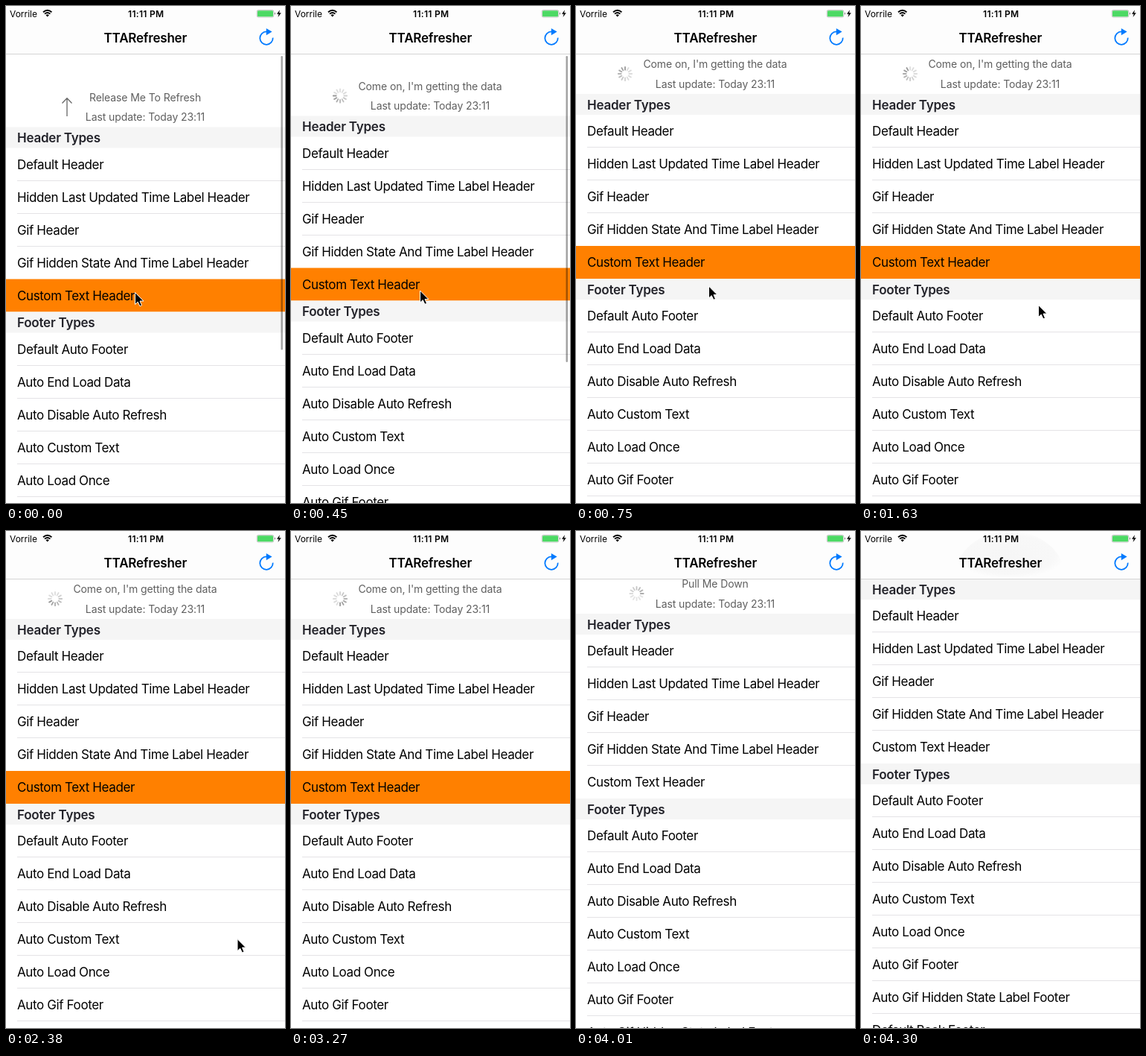
An HTML page for the animation above (4.75 s loop, 375x667 px).

```html
<!DOCTYPE html>
<html lang="en">
<head>
<meta charset="utf-8">
<title>TTARefresher</title>
<style>
  html, body { margin: 0; width: 100%; height: 100%; overflow: hidden; background: #fff; }
  svg { display: block; width: 375px; height: 667px; }
  text { font-family: Inter, Roboto, sans-serif; fill: #000; }
  .row { font-size: 17px; letter-spacing: -.38px; }
  .head { font-size: 17px; font-weight: 600; letter-spacing: -.23px; fill: #23232a; }
  .title { font-size: 17px; font-weight: 600; letter-spacing: -.2px; }
  .label { font-size: 14px; letter-spacing: -.09px; fill: #5f5f5f; }
  .status { font-size: 12px; }
  .clock { font-weight: 600; letter-spacing: .3px; }
  .mid { text-anchor: middle; }
</style>
</head>
<body>
<svg viewBox="0 0 375 667" xmlns="http://www.w3.org/2000/svg">
  <defs>
    <radialGradient id="haze">
      <stop offset="0" stop-color="#f6f6f6"/>
      <stop offset=".8" stop-color="#f8f8f8"/>
      <stop offset="1" stop-color="#fdfdfd"/>
    </radialGradient>
  </defs>
  <rect width="375" height="667" fill="#fff"/>

  <g id="list">
    <text id="state" class="label mid" x="187" y="-35"></text>
    <text class="label mid" x="187" y="-8.5">Last update: Today 23:11</text>
    <path id="arrow" d="M82 -39V-14.5M75.5 -32L82 -38.7L88.5 -32" fill="none" stroke="#666" stroke-width="1.3"/>
    <g id="spinner"></g>
  </g>

  <rect id="bar" x="369.5" y="67" width="2.5" rx="1.25" fill="#000" fill-opacity=".36"/>

  <rect width="375" height="64" fill="#fdfdfd"/>
  <path id="glow" d="M125 64A75 64 0 0 1 275 64Z" fill="url(#haze)"/>
  <rect y="64" width="375" height="1" fill="#d4d4d4"/>
  <text class="title mid" x="187.3" y="48.5">TTARefresher</text>

  <text class="status" x="5" y="14.5">Vorrile</text>
  <g fill="none" stroke="#000" stroke-width="1.9">
    <path d="M50 8.3Q55.7 3.1 61.4 8.3M52 10.6Q55.7 7.2 59.4 10.6"/>
  </g>
  <path d="M53.5 12.2Q55.7 10.2 57.9 12.2L55.7 14.6Z"/>
  <text class="status clock mid" x="188.3" y="14.5">11:11 PM</text>
  <rect x="337.2" y="5.5" width="22.6" height="9.5" rx="2" fill="none" stroke="#8a8a8a" stroke-width=".5"/>
  <rect x="338" y="6.3" width="21" height="7.9" rx="1.2" fill="#4cd964"/>
  <path d="M361 8.6Q363 10.2 361 11.8Z" fill="#666"/>
  <path d="M368 5.3L364 10.8H366.6L365.6 15L369.8 9.3H367.1Z"/>

  <path d="M350 34.4A8.7 8.7 0 1 0 358.7 42.6" fill="none" stroke="#007aff" stroke-width="1.8"/>
  <path d="M349.8 30L357.6 34.6L349.8 39.2Z" fill="#007aff"/>

  <path id="cursor" d="M0 0V16L3.7 12.6L6.4 18.3L9 17.2L6.5 11.5H11.4Z"
        stroke="#fff" stroke-width="1" stroke-linejoin="round"/>
</svg>
<script>
const $ = id => document.getElementById(id);
const LOOP = 4750, HOLD = 450, LAST = 26;
const PICKED = 'Custom Text Header';
const sections = [
  ['Header Types', ['Default Header', 'Hidden Last Updated Time Label Header', 'Gif Header',
    'Gif Hidden State And Time Label Header', PICKED]],
  ['Footer Types', ['Default Auto Footer', 'Auto End Load Data', 'Auto Disable Auto Refresh',
    'Auto Custom Text', 'Auto Load Once', 'Auto Gif Footer',
    'Auto Gif Hidden State Label Footer', 'Default Back Footer']]
];
// pointer stops: step, x, y
const stops = [[-1, 173.5, 384.5], [0, 173.5, 382], [2, 178.5, 376], [8, 238.5, 401.5],
  [15, 340, 606], [16, 358, 642], [17, 376, 680]];

function add(parent, tag, attrs, label) {
  const el = document.createElementNS('http://www.w3.org/2000/svg', tag);
  for (const key in attrs) el.setAttribute(key, attrs[key]);
  if (label) el.textContent = label;
  return parent.appendChild(el);
}

// Returns the highlight of the picked row and the hairline it replaces.
function buildList() {
  const list = $('list');
  let y = 0, fill, line;
  for (const [name, rows] of sections) {
    add(list, 'rect', { y, width: 375, height: 28, fill: '#f5f5f5' });
    add(list, 'text', { class: 'head', x: 15, y: y + 20.5 }, name);
    y += 28;
    rows.forEach((row, i) => {
      const rule = i && add(list, 'rect', { x: 15, y: y - .5, width: 360, height: .5, fill: '#c8c7cc' });
      if (row === PICKED) {
        line = rule;
        fill = add(list, 'rect', { y, width: 375, height: 44, fill: '#ff8000' });
      }
      add(list, 'text', { class: 'row', x: 15, y: y + 28 }, row);
      y += 44;
    });
  }
  return [fill, line];
}

const [pickFill, pickLine] = buildList();
const petals = Array.from({ length: 12 }, (_, i) => add($('spinner'), 'line',
  { y1: -5.3, y2: -9.2, stroke: '#777', 'stroke-width': 1.8, 'stroke-linecap': 'round',
    transform: `rotate(${i * 30})` }));

const smooth = u => { u = Math.min(1, Math.max(0, u)); return u * u * (3 - 2 * u); };
const show = (el, alpha) => el.setAttribute('opacity', alpha);
const stepStart = k => HOLD + 10 * Math.floor(14.83 * k + .35);

function stepAt(t) {
  let k = LAST;
  while (k >= 0 && stepStart(k) > t) k--;
  return k;
}

function pointerAt(k) {
  const i = stops.findIndex(s => s[0] >= k);
  if (i < 0) return null;
  if (i === 0) return stops[0].slice(1);
  const [k0, x0, y0] = stops[i - 1], [k1, x1, y1] = stops[i];
  const u = (k - k0) / (k1 - k0);
  return [x0 + (x1 - x0) * u, y0 + (y1 - y0) * u];
}

// List position, snapped to half points as on a 2x screen.
function listTop(k) {
  const top = k >= 24 ? 118 - 54 * smooth(.225 + .39 * (k - 24))
                      : 162.5 - 44.5 * smooth(.39 * (k + 1));
  return Math.round(top * 2) / 2;
}

function draw(t) {
  const k = stepAt(t), busy = k >= 0 && k < 24, ending = k >= 24;
  const top = listTop(k);
  $('list').setAttribute('transform', `translate(0 ${top})`);
  $('state').textContent = busy ? "Come on, I'm getting the data"
    : ending ? 'Pull Me Down' : 'Release Me To Refresh';

  show($('arrow'), k < 0 ? 1 : 0);
  show($('spinner'), busy ? 1 : ending ? Math.max(0, .8 - .4 * (k - 24)) : 0);
  $('spinner').setAttribute('transform', `translate(${ending ? 81.5 : 66} -27)`);
  const lead = 9 + Math.floor(k * 148.3 * 12 / 1000);
  petals.forEach((p, i) => {
    const age = ((lead - i) % 12 + 12) % 12;
    show(p, Math.max(.25, .75 - age * .07));
  });

  show(pickFill, ending ? 0 : 1);
  show(pickLine, ending ? 1 : 0);
  show($('bar'), k < 1 ? 1 : k === 1 ? .6 : 0);
  $('bar').setAttribute('height', 394.5 + (162.5 - top) * 1.1);
  show($('glow'), k === LAST ? 1 : 0);

  const p = pointerAt(k);
  show($('cursor'), p ? 1 : 0);
  if (p) $('cursor').setAttribute('transform', `translate(${p[0]} ${p[1]})`);
}

const begin = performance.now();
function tick() {
  draw((performance.now() - begin) % LOOP);
  requestAnimationFrame(tick);
}
tick();
</script>
</body>
</html>
```
